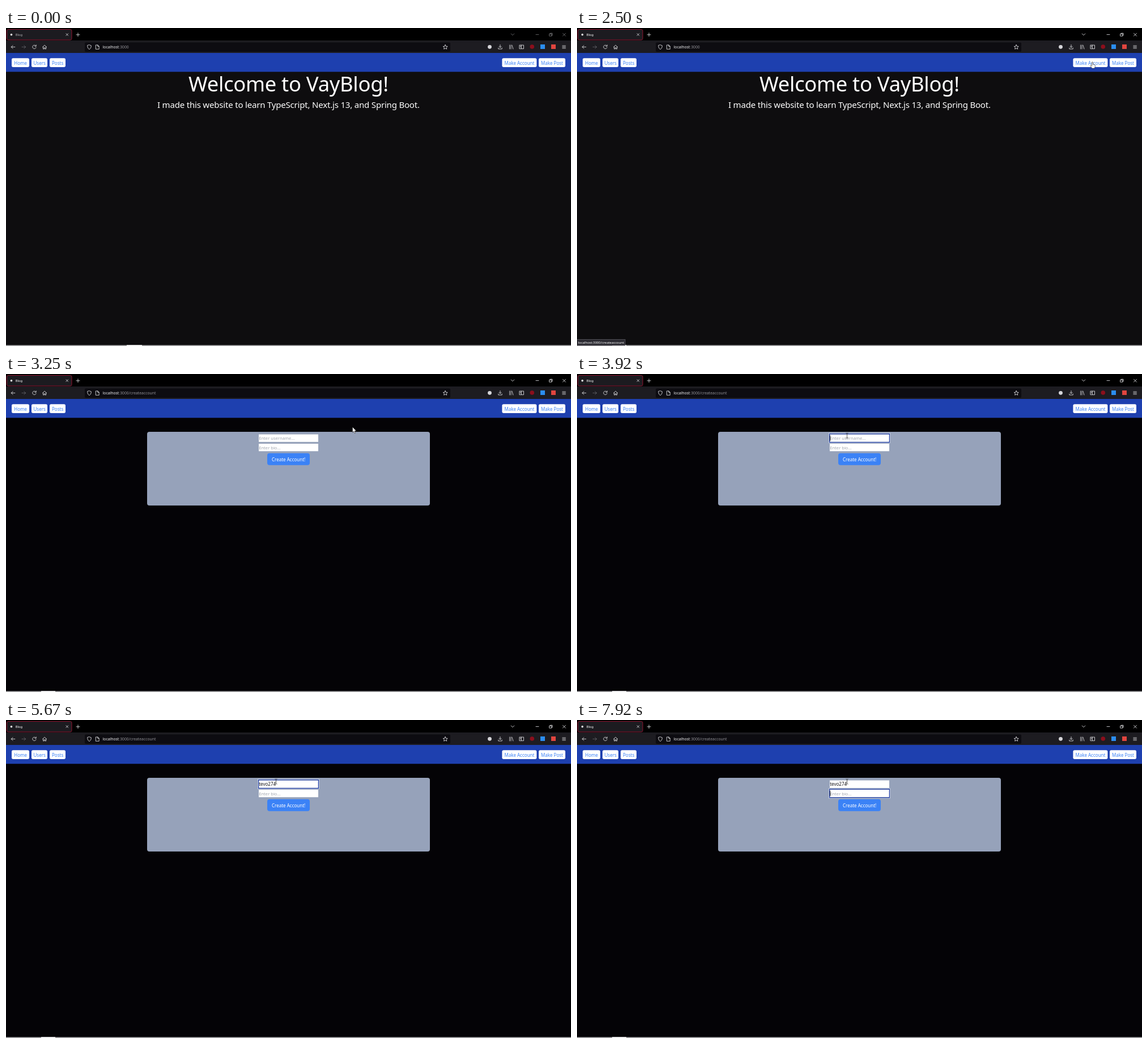
Write an HTML page that moves like this. It is 997 px wide and 561 px high and loops after 8000 ms.

```html
<!DOCTYPE html>
<html lang="en">
<head>
<meta charset="utf-8">
<title>Blog</title>
<style>
  html, body { margin: 0; width: 100%; height: 100%; overflow: hidden; background: #000; }
  svg { display: block; width: 997px; height: 561px; font-family: "Noto Sans", "Open Sans", sans-serif; }
  text { white-space: pre; }
  .line { fill: none; stroke: #d6d6da; stroke-width: .9; stroke-linecap: round; stroke-linejoin: round; }
  .ui { font-size: 8px; }
  .hint { font-size: 7.6px; fill: #a0a5af; }
  .focus { fill: none; stroke: #2440a4; stroke-width: 1.3; }
  .halo { fill: none; stroke: #dfe5f5; stroke-width: .7; }
</style>
</head>
<body>
<svg viewBox="0 0 997 561">
  <rect width="997" height="561" fill="#000"/>

  <!-- tab strip -->
  <rect x="1.5" y="2.5" width="114.5" height="18.5" rx="2.5" fill="#1c1b20" stroke="#8f1530"/>
  <circle cx="9.5" cy="11.8" r="1.8" fill="#fff"/>
  <text id="tab" x="16.7" y="14" font-size="5.8">Blog</text>
  <path class="line" d="M106 9.8l3.6 3.6m0-3.6l-3.6 3.6M124 11.8h6m-3-3v6"/>
  <g id="controls">
    <path class="line" d="M891.2 10l2.8 2.8 2.8-2.8M935 11.6h5M959 10.4h3.8v3.8h-3.8zM960.2 10.2v-1h3.8v3.8h-1M982.5 9.2l5 5m0-5l-5 5"/>
  </g>

  <!-- toolbar -->
  <rect y="22" width="997" height="22" fill="#1d1c21"/>
  <rect x="139" y="25.5" width="645" height="16.5" rx="2" fill="#0d0c11"/>
  <path class="line" d="M15.8 33.5h-6.6l2.8-2.8m-2.8 2.8l2.8 2.8"/>
  <path class="line" stroke-opacity=".35" d="M28 33.5h6.6l-2.8-2.8m2.8 2.8l-2.8 2.8"/>
  <path class="line" d="M52.6 31.5a3.2 3.2 0 1 0 .5 2.8M53.2 29.8v2.4h-2.4"/>
  <path class="line" d="M64.6 33.6l3.5-3.4 3.5 3.4M65.6 33v4h1.7v-2.2h1.6v2.2h1.7v-4"/>
  <path class="line" d="M147 29.8l3.3 1.2c0 3.4-1 5.4-3.3 6.6c-2.3-1.2-3.3-3.2-3.3-6.6z"/>
  <path class="line" d="M158.7 30h3.2l2.3 2.3v5h-5.5zM161.8 30v2.4h2.3"/>
  <text x="170.6" y="36" font-size="6.8" fill="#f0f0f2">localhost<tspan id="path" fill="#929197">:3000</tspan></text>
  <path class="line" d="M775.2 29.6l1.2 2.6 2.8.3-2.1 1.9.6 2.8-2.5-1.4-2.5 1.4.6-2.8-2.1-1.9 2.8-.3z"/>
  <circle cx="853.5" cy="33.3" r="3.4" fill="#d6d6da"/>
  <path class="line" d="M872 29.6v4.8m-2-2l2 2 2-2M868.8 35v2h6.4v-2"/>
  <path class="line" d="M888.7 30v7M891 30v7M892.9 30.2l2 6.8"/>
  <path class="line" d="M906.3 30.2h7.2v6.4h-7.2zM909.4 30.2v6.4M907.4 32h.8m-.8 1.6h.8"/>
  <circle cx="928.3" cy="33" r="3.8" fill="#8c0f1c"/>
  <rect x="943" y="29" width="8" height="8" fill="#2b8df0"/>
  <rect x="962" y="29" width="8" height="8" fill="#e0453f"/>
  <path class="line" d="M981.8 31.2h5.6m-5.6 2.3h5.6m-5.6 2.3h5.6"/>

  <!-- site -->
  <rect id="page" y="77" width="997" height="484"/>
  <rect y="44" width="997" height="33.3" fill="#1e40af"/>
  <g id="nav" class="ui"></g>

  <g id="home" fill="#fff">
    <text x="322" y="112" font-size="36.4" letter-spacing="-.3">Welcome to VayBlog!</text>
    <text x="267" y="141" font-size="15" letter-spacing="-.19">I made this website to learn TypeScript, Next.js 13, and Spring Boot.</text>
  </g>

  <g id="form">
    <rect x="249" y="102" width="499" height="130" rx="4" fill="#96a2ba"/>
    <rect x="446" y="106.5" width="105" height="13.3" fill="#fff"/>
    <rect x="446" y="123" width="105" height="13.2" fill="#fff"/>
    <g id="ring">
      <rect class="halo" x="444.5" y="104.6" width="108" height="17"/>
      <rect class="focus" x="445.6" y="105.7" width="105.8" height="14.8"/>
    </g>
    <text id="hint" class="hint" x="446.2" y="116.4">Enter username...</text>
    <text id="user" class="ui" x="446.2" y="116.4" fill="#16161a"></text>
    <text class="hint" x="446.2" y="132.8">Enter bio...</text>
    <rect id="caret" width=".9" height="10" fill="#111"/>
    <rect x="461" y="139.8" width="75" height="21" rx="4" fill="#3b82f6"/>
    <text class="ui" x="469" y="153.8" fill="#fff">Create Account!</text>
  </g>

  <rect y="559.5" width="997" height="1.5" fill="#b4b4b6"/>
  <rect id="task" y="559.3" height="1.7" fill="#fff"/>
  <g id="status">
    <rect x="-.5" y="549.5" width="85.5" height="10.5" fill="#2b2a31" stroke="#5a5960" stroke-width=".8"/>
    <text x="1.8" y="557.3" font-size="5.9" fill="#fff">localhost:3000/createaccount</text>
  </g>

  <g id="pointer">
    <path id="arrow" d="M0 0v9.6l2.2-2 1.6 3.6 1.5-.7-1.5-3.4h2.9z" fill="#fff" stroke="#000" stroke-width=".5"/>
    <path id="hand" d="M-.9.3q.9-1 1.8 0v4l3.2.7q1 .3.9 1.4l-.5 2.8-1 1.9h-4.3l-1.7-2.6-1.4-2q.7-1.2 1.7-.3l1.3 1z" fill="#fff" stroke="#222" stroke-width=".6"/>
    <path id="beam" d="M-2-4.4q1.6 0 2 .7q.4-.7 2-.7M0-3.7v7.4M-2 4.4q1.6 0 2-.7q.4.7 2 .7" fill="none" stroke="#333" stroke-width=".8"/>
  </g>
</svg>
<script>
const LOOP = 8000, STEP = 1000 / 12;
const $ = id => document.getElementById(id);
const show = (id, on) => $(id).setAttribute('display', on ? 'inline' : 'none');
const set = (id, attrs) => { for (const k in attrs) $(id).setAttribute(k, attrs[k]); };

// label, left edge, width, text offset
$('nav').innerHTML = [
  ['Home', 10, 31, 4.3], ['Users', 45, 28, 3.5], ['Posts', 77, 28, 4],
  ['Make Account', 875.4, 61, 4], ['Make Post', 940, 47, 4]
].map(([label, x, w, dx]) =>
  `<rect x="${x}" y="53.3" width="${w}" height="15.6" rx="2.6" fill="#fff"/>` +
  `<text x="${x + dx}" y="64.5" fill="#3b82f6">${label}</text>`).join('');

// time, x, y
const PATH = [
  [170, 75, 575], [500, 380, 480], [880, 890, 308], [1080, 904, 91],
  [1670, 904, 91], [2000, 909.5, 60], [2830, 909.5, 60], [3500, 476.5, 108.6]
];
const CREATE = 2580, FOCUS = 3750, TYPE = 4500, TYPED = 4920, TAB = 6750;
const NAME = 'tevo274';

function pointerAt(t) {
  const i = PATH.findIndex(p => p[0] > t);
  if (i < 0) return PATH[PATH.length - 1].slice(1);
  if (i === 0) return PATH[0].slice(1);
  const [t0, x0, y0] = PATH[i - 1], [t1, x1, y1] = PATH[i];
  const u = (t - t0) / (t1 - t0), e = u * u * (3 - 2 * u);
  return [x0 + (x1 - x0) * e, y0 + (y1 - y0) * e];
}

function typedAt(t) {
  if (t < TYPE) return 0;
  return t >= TYPED ? NAME.length : 1 + Math.floor((t - TYPE + 5) / STEP);
}

function draw(t) {
  const active = t >= 80, form = t >= CREATE, bio = t >= TAB;

  set('tab', { fill: active ? '#fff' : '#b0b0b4' });
  set('controls', { opacity: active ? 1 : .5 });
  set('task', active ? { x: 62, width: 25 } : { x: 213, width: 27 });
  $('path').textContent = form ? ':3000/createaccount' : ':3000';
  set('page', { fill: form ? '#040306' : '#0e0d0f' });
  show('home', !form);
  show('form', form);

  const n = typedAt(t);
  $('user').textContent = NAME.slice(0, n);
  show('hint', n === 0);
  show('ring', t >= FOCUS);
  set('ring', { transform: `translate(0 ${bio ? 16.3 : 0})` });

  // each input restarts the caret's blink
  const since = bio ? TAB : t >= TYPED ? TYPED : t >= TYPE ? t : FOCUS;
  show('caret', t >= FOCUS && (t - since) % 1000 < 495);
  const end = n && !bio ? $('user').getComputedTextLength() : 0;
  set('caret', { x: 446.2 + end, y: bio ? 124.5 : 108.2 });

  const [x, y] = pointerAt(t);
  const over = x > 875 && x < 936 && y > 53 && y < 69;
  const inField = form && x > 446 && x < 551 && y > 106 && y < 120;
  set('pointer', { transform: `translate(${x} ${y})` });
  show('hand', over);
  show('beam', inField);
  show('arrow', !over && !inField);
  show('status', over);
}

const start = performance.now();
function tick() {
  const t = (performance.now() - start) % LOOP;
  draw(Math.floor((t + 4) / STEP) * STEP + 1);
  requestAnimationFrame(tick);
}
draw(0);
requestAnimationFrame(tick);
</script>
</body>
</html>
```
